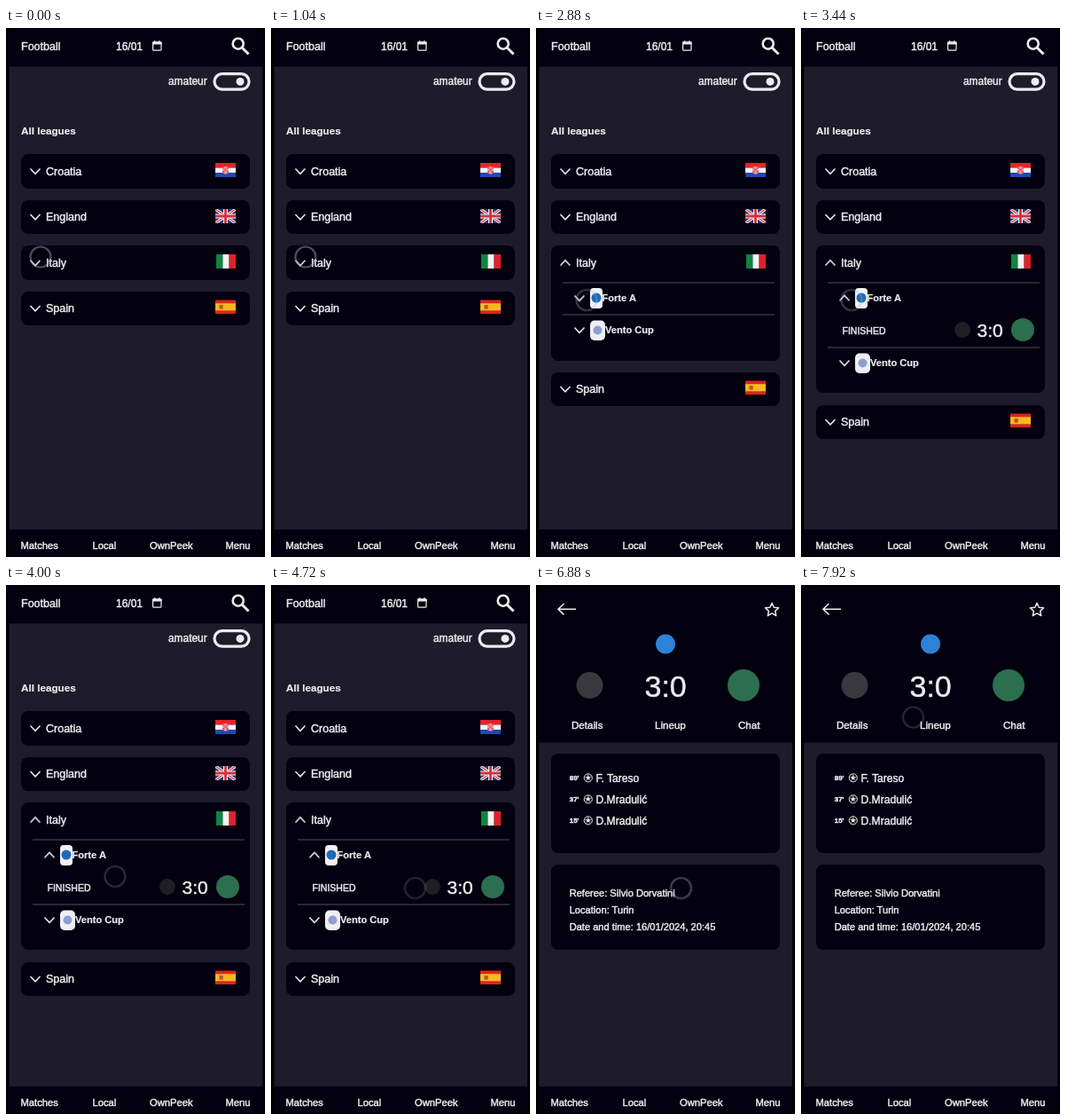
An HTML page that plays this animation: 292 by 596 pixels, repeating every 8000 ms.

```html
<!DOCTYPE html>
<html lang="en">
<head>
<meta charset="utf-8">
<title>Football scores</title>
<style>
  :root { --bg: #1e1c2a; --dark: #03010f; --ink: #ececf0; --loop: 8s; --ease: cubic-bezier(.4, 0, .2, 1); }
  html, body { margin: 0; width: 100%; height: 100%; overflow: hidden; background: #000; }
  #stage { position: relative; width: 292px; height: 596px; overflow: hidden; background: #000; }
  svg { position: absolute; left: 0; top: 0; display: block; }
  text {
    font: 12.5px "Liberation Sans", Arial, sans-serif;
    fill: var(--ink); stroke: var(--ink); stroke-width: .45px;
  }
  .bold { font-weight: bold; stroke-width: .2px; }
  .nav text { font-size: 11.2px; }
  .tabs text { font-size: 11.6px; }
  .info text { font-size: 11.1px; }
  .scorers text { font-size: 12.1px; }
  .minutes text { font-size: 8px; font-weight: bold; }
  .league { font-size: 11.1px; }
  .line { fill: none; stroke: var(--ink); stroke-width: 1.5; }
  .rule { stroke: #373542; stroke-width: 1.5; }
  .card { fill: var(--dark); }

  #list, #match, #panel, #spain, #cup, #row, #cursor, .flip {
    animation: var(--loop) linear infinite;
  }
  #list { animation-name: leave; }
  #match { animation-name: enter; }
  #panel {
    position: absolute; left: 17px; top: 245px; width: 258px; height: 39px;
    overflow: hidden; border-radius: 8px; background: var(--dark);
    animation-name: grow;
  }
  #spain { animation-name: push; }
  #cup { animation-name: shift; }
  #row { animation-name: reveal; }
  #cursor { fill: none; stroke: #b4b2bd; stroke-width: 2.2; animation-name: point; }
  .flip { transform-box: fill-box; transform-origin: center; }
  #chevItaly { animation-name: flipItaly; }
  #chevLeague { animation-name: flipLeague; }

  @keyframes leave { 0%, 74.99% { visibility: visible } 75%, 100% { visibility: hidden } }
  @keyframes enter { 0%, 74.99% { visibility: hidden } 75%, 100% { visibility: visible } }
  @keyframes grow {
    0%, 15% { height: 39px; animation-timing-function: var(--ease) }
    17.5%, 37% { height: 130px; animation-timing-function: var(--ease) }
    39.5%, 100% { height: 166px }
  }
  @keyframes push {
    0%, 15% { transform: none; animation-timing-function: var(--ease) }
    17.5%, 37% { transform: translateY(91px); animation-timing-function: var(--ease) }
    39.5%, 100% { transform: translateY(128px) }
  }
  @keyframes shift {
    0%, 37% { transform: none; animation-timing-function: var(--ease) }
    39.5%, 100% { transform: translateY(37px) }
  }
  @keyframes reveal { 0%, 37.5% { opacity: 0 } 39.5%, 100% { opacity: 1 } }
  @keyframes flipItaly { 0%, 15% { transform: scaleY(1) } 17.5%, 100% { transform: scaleY(-1) } }
  @keyframes flipLeague { 0%, 37% { transform: scaleY(1) } 39.5%, 100% { transform: scaleY(-1) } }
  @keyframes point {
    0%, 18% { transform: translate(39px, 258px); opacity: .42; animation-timing-function: ease-in-out }
    23%, 46% { transform: translate(57px, 306.5px); opacity: .32; animation-timing-function: ease-in-out }
    53%, 74.99% { transform: translate(162.5px, 341.5px); opacity: .22 }
    75%, 92% { transform: translate(163.5px, 341.5px); opacity: .38; animation-timing-function: ease-in-out }
    98%, 100% { transform: translate(126.5px, 149px); opacity: .22 }
  }
</style>
</head>
<body>
<div id="stage">
  <svg width="292" height="596">
    <defs>
      <path id="chev" class="line" d="M-5.5-3 0 2.8 5.5-3"/>
      <g id="ball">
        <circle r="4.6" fill="#15131f" stroke="#dcdce2" stroke-width="1"/>
        <path d="M0-2.2 2.1-.7 1.3 1.8H-1.3L-2.1-.7Z" fill="#ececf0"/>
        <path d="M0-4.5V-2M4.3-1.4 2-.7M2.7 3.7 1.3 1.8M-2.7 3.7-1.3 1.8M-4.3-1.4-2-.7" stroke="#bbb" stroke-width=".8"/>
      </g>
    </defs>
    <rect x="3.5" width="285.5" height="596" fill="var(--bg)"/>
  </svg>

  <div id="list">
    <svg width="292" height="596">
      <rect class="card" x="3" width="286" height="43.5"/>
      <text x="17" y="24.5">Football</text>
      <text x="124" y="24.5" style="font-size:12px">16/01</text>
      <rect class="line" x="165.6" y="16.2" width="9.4" height="9" rx="1" style="stroke-width:1.2"/>
      <path d="M165 15.5H175.6V18.5H165ZM167 14.2h1.4v2H167ZM172.2 14.2h1.4v2h-1.4Z" fill="#ececf0"/>
      <circle class="line" cx="261.7" cy="17.7" r="6" style="stroke-width:2.6"/>
      <path class="line" d="M266 22 273.5 29.5" style="stroke-width:3"/>

      <text x="183" y="64.3" style="font-size:11.9px">amateur</text>
      <rect class="line" x="235" y="51.7" width="39" height="17.4" rx="8.7" style="stroke-width:3.2"/>
      <circle cx="264" cy="60.4" r="4.5" fill="#ececf0"/>
      <text class="bold" x="17" y="120" style="font-size:11.7px">All leagues</text>

      <rect class="card" x="17" y="142" width="258" height="39" rx="8"/>
      <use href="#chev" x="33" y="161.5"/>
      <text x="45" y="165.7">Croatia</text>
      <g transform="translate(236 152)">
        <path d="M0 0H23V5.5H0Z" fill="#e8202a"/>
        <path d="M0 5.5H23V11H0Z" fill="#f4f2f4"/>
        <path d="M0 11H23V16H0Z" fill="#1f48b4"/>
        <path d="M8 4H15V9.5Q15 12 11.5 12.8 8 12 8 9.5Z" fill="#eba4a4"/>
        <path d="M8 4h2.3v2.5H8ZM12.6 4H15v2.5h-2.4ZM10.3 6.5h2.3V9h-2.3ZM8 9h2.3v2.5H8ZM12.6 9H15v2.5h-2.4Z" fill="#dc5a64"/>
      </g>

      <rect class="card" x="17" y="194" width="258" height="38" rx="8"/>
      <use href="#chev" x="33" y="213"/>
      <text x="45" y="217.3">England</text>
      <svg x="236" y="204" width="23" height="16" viewBox="0 0 23 16">
        <path d="M0 0H23V16H0Z" fill="#263a78"/>
        <path d="M0 0 23 16M23 0 0 16" stroke="#f4f2f4" stroke-width="3.2"/>
        <path d="M0 0 23 16M23 0 0 16" stroke="#d3303e" stroke-width="1.1"/>
        <path d="M11.5 0V16M0 8H23" stroke="#f4f2f4" stroke-width="5"/>
        <path d="M11.5 0V16M0 8H23" stroke="#d3303e" stroke-width="2.8"/>
      </svg>

      <g id="spain">
        <rect class="card" x="17" y="297" width="258" height="38" rx="8"/>
        <use href="#chev" x="33" y="316"/>
        <text x="45" y="320.2">Spain</text>
        <path d="M236 306.5H259V322H236Z" fill="#dc2420"/>
        <path d="M236 310.2H259V318.3H236Z" fill="#f6b920"/>
        <path d="M240.5 312h4.2v4.6h-4.2Z" fill="#b5562a"/>
      </g>
    </svg>

    <div id="panel">
      <svg width="258" height="166" viewBox="17 245 258 166">
        <g transform="translate(33 264.8)"><path id="chevItaly" class="line flip" d="M-5.5-3 0 2.8 5.5-3"/></g>
        <text x="45" y="269">Italy</text>
        <path d="M237 255H244.4V271H237Z" fill="#0f8440"/>
        <path d="M244.4 255H251.6V271H244.4Z" fill="#f4f2f4"/>
        <path d="M251.6 255H259V271H251.6Z" fill="#e0202a"/>

        <path class="rule" d="M30 287H269"/>
        <g transform="translate(49 304.5)"><path id="chevLeague" class="line flip" d="M-5.5-3 0 2.8 5.5-3"/></g>
        <rect x="61" y="293" width="14" height="23" rx="4" fill="#f0f2f8"/>
        <circle cx="68" cy="304" r="5.5" fill="#1c69b8"/>
        <text class="bold league" x="74.5" y="308.3">Forte A</text>

        <g id="row">
          <text x="46.5" y="344.5" style="font-size:10.5px">FINISHED</text>
          <circle cx="182" cy="340" r="9" fill="#201f26"/>
          <text x="198.5" y="347.7" style="font-size:21px">3:0</text>
          <circle cx="250" cy="340" r="13" fill="#2b6f4f"/>
        </g>

        <g id="cup">
          <path class="rule" d="M30 323H269"/>
          <use href="#chev" x="49" y="340.5"/>
          <rect x="61" y="329.5" width="17" height="22.5" rx="5" fill="#eeeef6"/>
          <circle cx="69.5" cy="340.5" r="5" fill="#8c9fce"/>
          <text class="bold league" x="78" y="344.4">Vento Cup</text>
        </g>
      </svg>
    </div>
  </div>

  <svg id="match" width="292" height="596">
    <rect class="card" x="3" width="286" height="177.5"/>
    <path class="line" d="M45 27.2H25M31.5 21 25 27.2 31.5 33.4"/>
    <path class="line" d="M266 20.3 268.2 25.2 273.6 25.8 269.6 29.4 270.7 34.6 266 31.9 261.3 34.6 262.4 29.4 258.4 25.8 263.8 25.2Z" stroke-linejoin="round"/>
    <circle cx="146" cy="66.5" r="11" fill="#2b83d6"/>
    <circle cx="60.5" cy="113" r="15" fill="#39383f"/>
    <text x="122.5" y="126" style="font-size:34px">3:0</text>
    <circle cx="234" cy="113" r="18" fill="#2b6f4f"/>
    <g class="tabs">
      <text x="40" y="162">Details</text>
      <text x="134" y="162">Lineup</text>
      <text x="228" y="162">Chat</text>
    </g>

    <rect class="card" x="17" y="190" width="258" height="112" rx="8"/>
    <g class="minutes">
      <text x="37.7" y="220">89'</text>
      <text x="37.7" y="244">37'</text>
      <text x="37.7" y="268">15'</text>
    </g>
    <use href="#ball" x="58.8" y="217.3"/>
    <use href="#ball" x="58.8" y="241.3"/>
    <use href="#ball" x="58.8" y="265.3"/>
    <g class="scorers">
      <text x="67.5" y="221.5">F. Tareso</text>
      <text x="67.5" y="245.5">D.Mradulić</text>
      <text x="67.5" y="269.5">D.Mradulić</text>
    </g>

    <rect class="card" x="17" y="315" width="258" height="96" rx="8"/>
    <g class="info">
      <text x="37.7" y="351.3">Referee: Silvio Dorvatini</text>
      <text x="37.7" y="370.3">Location: Turin</text>
      <text x="37.7" y="389.3">Date and time: 16/01/2024, 20:45</text>
    </g>
  </svg>

  <svg class="nav" width="292" height="596">
    <rect class="card" x="3" y="565" width="286" height="31"/>
    <text x="16.5" y="587.3">Matches</text>
    <text x="97.5" y="587.3">Local</text>
    <text x="162" y="587.3">OwnPeek</text>
    <text x="247.5" y="587.3">Menu</text>
    <circle id="cursor" r="11.5"/>
  </svg>
</div>
</body>
</html>
```
